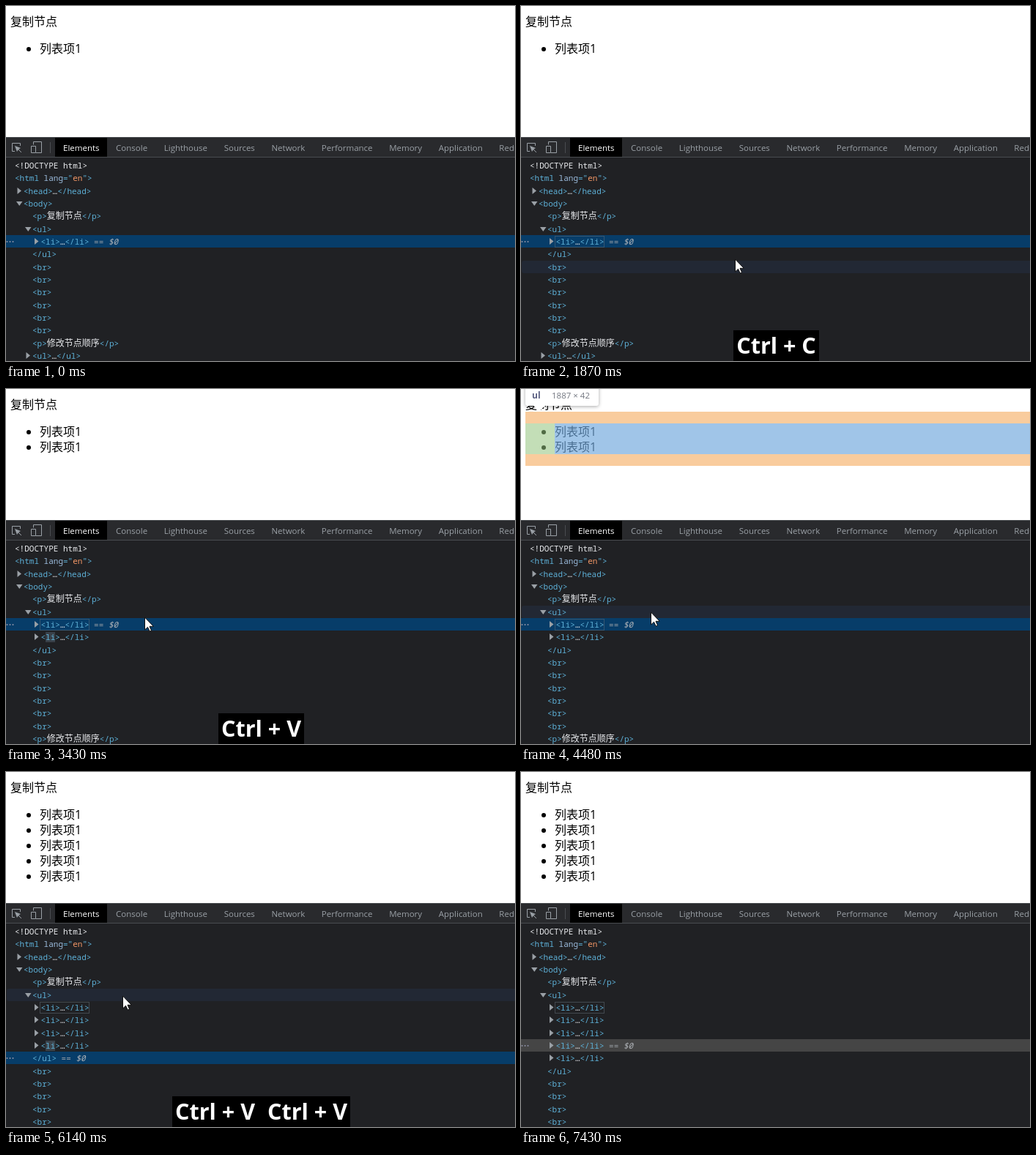
These frames come from a looping animation (695 by 485 pixels, 7.49 s). An HTML page with a canvas:

```html
<!DOCTYPE html>
<html lang="zh-CN">
<head>
<meta charset="utf-8">
<title>复制节点</title>
<style>
html, body { margin: 0; width: 100%; height: 100%; overflow: hidden; background: #202124; }
canvas { display: block; }
</style>
</head>
<body>
<canvas id="stage" width="695" height="485"></canvas>
<script>
const ctx = document.getElementById('stage').getContext('2d');
const W = 695, H = 485, LOOP = 7490;
const TREE_TOP = 209, ROW_H = 52 / 3, UL_ROW = 5;
const UI = '"Open Sans", "Noto Sans CJK SC", "Noto Sans CJK", sans-serif';
const CJK = '12px "Noto Sans CJK SC", "Noto Sans CJK", sans-serif';
const MONO = '500 11px "Noto Sans Mono", monospace';
const BLUE = '#5db0d7', LIGHT = '#e8eaed', GREY = '#9aa0a6', LINE = '#494c50';

// Pointer moves: start, end, x, y. It rests between them and leaves after the last.
const START = [375, 440];
const moves = [[30, 480, 132, 318], [800, 1400, 302, 348], [1750, 2310, 222, 330],
  [2470, 2540, 215, 314], [2720, 3460, 189, 312], [3490, 3990, 180, 311.5],
  [4150, 4250, 177, 305], [5230, 5940, 159, 306], [6140, 6720, 60, 150], [6750, 7130, 2, 135]];
const clicks = [[500, 640], [4530, 4640]];
const copyTime = 1100, pasteTimes = [2790, 4800, 5550, 6030];
const selections = [[0, 6], [4640, 5], [5700, 10], [6180, 9]];
const BLUR_TIME = 7430, HOVER_LAG = 60, KEY_HOLD = 1100;
const PAGE_LAG = 80, TREE_LAG = 150, OVERLAY_LAG = 450;

const pastesBy = t => pasteTimes.filter(time => time <= t).length;
const pageItems = t => 1 + pastesBy(t - PAGE_LAG);
const treeItems = t => 1 + pastesBy(t - TREE_LAG);
const pressed = t => clicks.some(([down, up]) => t >= down && t < up);
const smooth = p => p * p * (3 - 2 * p);

function pointerAt(t) {
  if (t < moves[0][0] || t >= moves.at(-1)[1]) return null;
  let [x, y] = START;
  for (const [start, end, toX, toY] of moves) {
    const p = smooth(Math.min(1, Math.max(0, (t - start) / (end - start))));
    x += (toX - x) * p;
    y += (toY - y) * p;
  }
  return [x, y];
}

function hoveredRow(t) {
  const pointer = pointerAt(t - HOVER_LAG);
  return pointer ? Math.floor((pointer[1] + 2 - TREE_TOP) / ROW_H) : -1;
}

// A paste closes the page overlay until the pointer reaches another row.
function inspectedTag(t) {
  const row = hoveredRow(t), closing = UL_ROW + 1 + treeItems(t);
  const lastPaste = pasteTimes[pastesBy(t - OVERLAY_LAG) - 1];
  if (lastPaste && hoveredRow(lastPaste + OVERLAY_LAG) === row) return '';
  if (row === UL_ROW || row === closing) return 'ul';
  return row > UL_ROW && row < closing ? 'li' : '';
}

function rect(x, y, w, h, color) {
  ctx.fillStyle = color;
  ctx.fillRect(x, y, w, h);
}

function roundRect(x, y, w, h, r, color) {
  ctx.beginPath();
  ctx.roundRect(x, y, w, h, r);
  ctx.fillStyle = color;
  ctx.fill();
}

function disc(x, y, r, color) {
  ctx.beginPath();
  ctx.arc(x, y, r, 0, 7);
  ctx.fillStyle = color;
  ctx.fill();
}

function shape(path, x, y, fill, stroke) {
  const outline = new Path2D(path);
  ctx.save();
  ctx.translate(x, y);
  if (fill) { ctx.fillStyle = fill; ctx.fill(outline); }
  if (stroke) { ctx.strokeStyle = stroke; ctx.stroke(outline); }
  ctx.restore();
}

function text(str, x, y, font, color) {
  ctx.font = font;
  ctx.fillStyle = color;
  ctx.fillText(str, x, y);
  return ctx.measureText(str).width;
}

function drawTooltip(x, y, name, size) {
  ctx.save();
  ctx.shadowColor = 'rgba(0,0,0,.35)';
  ctx.shadowBlur = 5;
  ctx.shadowOffsetY = 1;
  roundRect(x, y, 100, 30, 3, '#fff');
  ctx.restore();
  shape('M-8 0H8L0 8z', x + 19, y + 29.5, '#fff');
  text(name, x + 9, y + 20, 'bold 12px ' + UI, '#5a5f82');
  text(size, x + 36, y + 20, '11.5px ' + UI, '#737780');
}

function drawPage(t) {
  const count = pageItems(t), tag = inspectedTag(t), height = 21 * count;
  const content = 'rgba(111,168,220,.66)', margin = 'rgba(246,178,107,.66)';
  rect(0, 0, W, 180, '#fff');
  text('复制节点', 6, 27, '16px ' + UI, '#000');
  for (let y = 47; y < 47 + height; y += 21) {
    disc(31, y + 12, 3, '#000');
    text('列表项1', 46, y + 17, '16px ' + UI, '#000');
  }
  if (tag === 'li') {
    rect(46, 47, W, 21, content);
    drawTooltip(46, 10, 'li', '1847 × 21');
  } else if (tag === 'ul') {
    rect(6, 31, W, 16, margin);
    rect(6, 47, 40, height, 'rgba(147,196,125,.55)');
    rect(46, 47, W, height, content);
    rect(6, 47 + height, W, 16, margin);
    drawTooltip(6, -7, 'ul', '1887 × ' + height);
  }
}

function drawToolbar() {
  rect(0, 179, W, H, '#202124');
  rect(0, 180, W, 26, '#292a2d');
  rect(0, 179, W, 1, LINE);
  rect(0, 206, W, 1, LINE);
  rect(60, 186, 1, 15, LINE);
  rect(67, 180, 71, 26, '#000');
  shape('M4 11.5H.5V.5H11.5V4M8 8l5 5', 8, 187, '', GREY);
  shape('M4 4l8 3-3 2-2 3z', 8, 187, GREY);
  shape('M3.5 4.5V.5H14.5V15.5H7M.5 6.5h6v9h-6z', 34, 185, '', GREY);
  let x = 78;
  for (const label of ['Elements', 'Console', 'Lighthouse', 'Sources', 'Network',
    'Performance', 'Memory', 'Application', 'Redux']) {
    x += 22.6 + text(label, x, 198, '11.5px ' + UI, x === 78 ? '#fff' : GREY);
  }
}

function treeRows(items) {
  const row = (x, arrow, ...parts) => ({ x, arrow, parts });
  const repeat = (length, make) => Array.from({ length }, make);
  const folded = (x, name) =>
    row(x, 'right', [`<${name}>`, BLUE], ['…', LIGHT], [`</${name}>`, BLUE]);
  const paragraph = str => row(36, '', ['<p>', BLUE], [str, LIGHT, CJK], ['</p>', BLUE]);
  return [
    row(12, '', ['<!DOCTYPE html>', LIGHT]),
    row(12, '', ['<html ', BLUE], ['lang', '#9bbbdc'], ['="', BLUE], ['en', '#f29766'], ['">', BLUE]),
    folded(24, 'head'),
    row(24, 'down', ['<body>', BLUE]),
    paragraph('复制节点'),
    row(36, 'down', ['<ul>', BLUE]),
    ...repeat(items, () => folded(47.5, 'li')),
    row(36, '', ['</ul>', BLUE]),
    ...repeat(6, () => row(36, '', ['<br>', BLUE])),
    paragraph('修改节点顺序'),
    folded(36, 'ul')
  ];
}

function drawTree(t) {
  const items = treeItems(t), hovered = hoveredRow(t);
  const selected = selections.findLast(([start]) => start <= t)[1];
  const focused = !pressed(t) && t < BLUR_TIME;
  const flash = 1 - (t - TREE_LAG - pasteTimes[items - 2]) / 1000;

  treeRows(items).forEach(({ x, arrow, parts }, i) => {
    const top = Math.round(TREE_TOP + ROW_H * i), base = top + 13;
    if (i === selected) {
      rect(0, top, W, 17, focused ? '#073d69' : '#454545');
      for (let dot = 1.5; dot < 10; dot += 4) disc(dot, top + 9, 1, '#8f92a8');
    } else if (i === hovered) {
      roundRect(1, top, W + 5, 17, 3, '#222834');
    }
    if (i === UL_ROW + items && flash > 0) {
      rect(54, top + 2, 13, 14, `rgba(130,155,175,${0.5 * flash})`);
    }
    if (arrow === 'right') shape('M0 0L5.5 4.5L0 9z', x - 8.5, top + 4, GREY);
    if (arrow === 'down') shape('M0 0H8.5L4.25 6z', x - 10, top + 6, GREY);

    let pen = x;
    for (const [str, color, font = MONO] of parts) pen += text(str, pen, base, font, color);
    if (i === selected) {
      pen += text(' == ', pen, base, MONO, GREY);
      text('$0', pen, base, 'italic ' + MONO, '#b0b4b9');
    }
    if (i === UL_ROW + 1 && t >= clicks[0][1]) {
      ctx.setLineDash([1, 1]);
      ctx.strokeStyle = '#64707a';
      ctx.strokeRect(46.5, top + 1.5, 67, 15);
      ctx.setLineDash([]);
    }
  });
}

function drawKeys(t) {
  const held = time => t >= time && t < time + KEY_HOLD;
  const labels = pasteTimes.filter(held).map(() => 'Ctrl + V');
  if (held(copyTime)) labels.push('Ctrl + C');
  if (!labels.length) return;
  const middle = 348.5, width = 126 * labels.length - 9;
  rect(middle - width / 2, 443, width, 42, '#000');
  ctx.textAlign = 'center';
  labels.forEach((label, i) =>
    text(label, middle + 126 * (i - (labels.length - 1) / 2), 475, 'bold 30.5px ' + UI, '#fff'));
  ctx.textAlign = 'left';
}

function drawPointer(t) {
  const pointer = pointerAt(t);
  if (!pointer) return;
  const [x, y] = pointer.map(Math.round);
  if (pressed(t)) disc(x, y, 12, 'rgba(190,180,20,.8)');
  shape('M.5 0V17L4.5 13.3L7.2 19L9.5 18L7 12.3H12.3z', x, y, '#fff', '#111');
}

function render(t) {
  drawPage(t);
  drawToolbar();
  drawTree(t);
  drawKeys(t);
  drawPointer(t);
}

const origin = performance.now();
function tick() {
  render((performance.now() - origin) % LOOP);
  requestAnimationFrame(tick);
}
tick();
</script>
</body>
</html>
```
